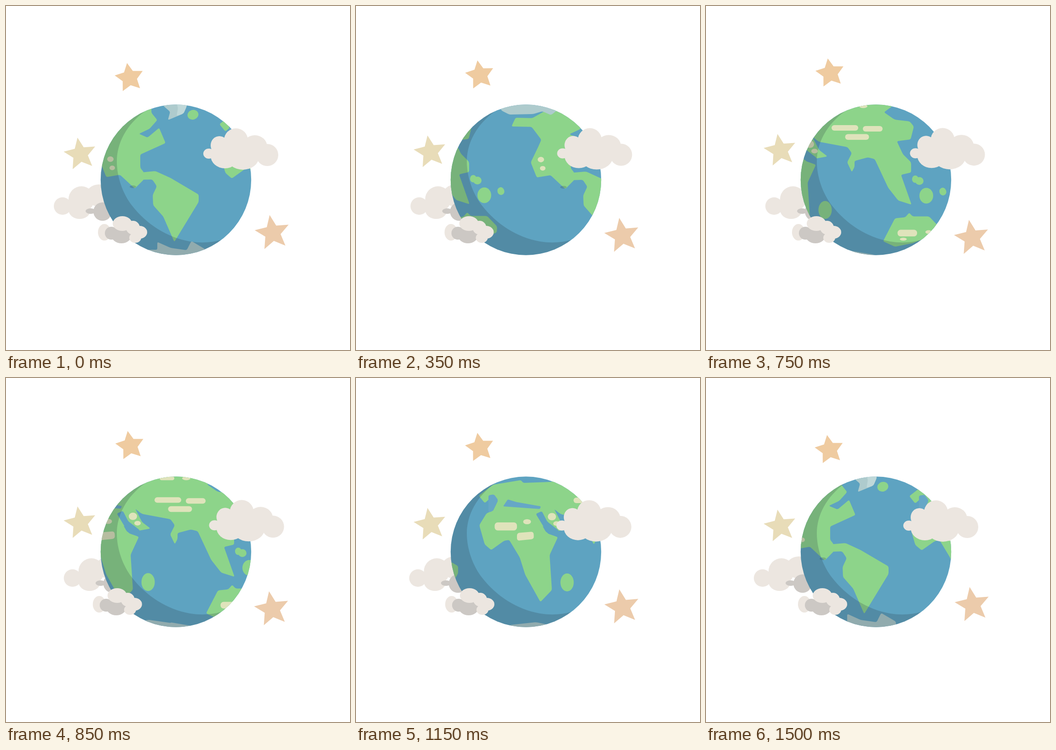
An HTML page with a canvas for the animation above (1.55 s loop, 748 by 748 pixels).

```html
<!DOCTYPE html>
<html lang="en">
<head>
<meta charset="utf-8">
<title>Spinning globe</title>
<style>
  html, body { margin: 0; overflow: hidden; background: #fff; }
  canvas { display: block; }
</style>
</head>
<body>
<canvas width="748" height="748"></canvas>
<script>
const ctx = document.querySelector('canvas').getContext('2d');
const LOOP = 1550, STEP = 50, TURN = 772, SPEED = 0.5, TILT = 0.005;
const SEA = '#5ea3c1', SEA_LIGHT = '#66a7c6', LAND = '#8dd48a', SAND = '#dfe3bb';
const ICE = '#aecbcd', ICE_LIGHT = '#bfd8d9', CLOUD = '#ece6e0', CLOUD_DARK = '#ccc8c4';
const SHADE = 'rgba(41,54,66,.22)';

// Closed outline through "x,y x,y ..." with softly rounded corners.
function coast(text, cut = 3.5) {
  const pts = text.trim().split(/\s+/).map(p => p.split(',').map(Number));
  const path = new Path2D();
  pts.forEach((p, i) => {
    const towards = q => {
      const k = Math.min(0.45, cut / Math.hypot(q[0] - p[0], q[1] - p[1]));
      return [p[0] + (q[0] - p[0]) * k, p[1] + (q[1] - p[1]) * k];
    };
    path.lineTo(...towards(pts.at(i - 1)));
    path.quadraticCurveTo(...p, ...towards(pts[(i + 1) % pts.length]));
  });
  path.closePath();
  return path;
}

function oval(x, y, rx, ry = rx, turn = 0) {
  const path = new Path2D();
  path.ellipse(x, y, rx, ry, turn, 0, 7);
  return path;
}

function pill(x, y, w, h) {
  const path = new Path2D();
  path.roundRect(x, y, w, h, Math.min(6.5, h / 2));
  return path;
}

function star(x, y, radius, waist) {
  const path = new Path2D();
  for (let i = 0; i < 10; i++) {
    const angle = (i * 36 - 99.3) * Math.PI / 180;
    const r = i % 2 ? radius * waist : radius;
    path.lineTo(x + r * Math.cos(angle), y + r * Math.sin(angle));
  }
  return path;
}

// Each region: how far its coordinates lie along the turn, then [colour, path] pairs.
const regions = [
  { at: 375, parts: [ // Eurasia
    [LAND, coast(`405,218 387,231 410,247 443,251 452,262 445,290 415,294 428,322 446,340 446,362 424,367
      447,432 418,423 396,395 367,333 352,329 323,337 323,350 317,361 307,340 317,320 308,307 245,295
      231,284 246,313 264,327 238,332 110,290 97,290 109,265 100,253 80,271 67,255 98,231 159,221
      163,227 225,225 300,195 400,195`)],
    [SAND, pill(273, 259, 58, 12)], [SAND, pill(341, 261, 43, 12)],
    [SAND, pill(302.5, 278.5, 52, 12.5)], [SAND, oval(342, 218, 9, 4)],
    [ICE, coast('300,545 307,531 367,541')],
  ] },
  { at: 575, parts: [ // Africa
    [LAND, coast(`268,320 280,362 294,374 322,354 333,352 356,390 368,428 401,487 426,461 421,385 439,346
      413,335 391,296 320,279 284,294`)],
    [SEA_LIGHT, coast('320,279 330,264 350,270 402,279 400,285', 2)],
    [SEA_LIGHT, coast('288,255 300,253 309,265 297,290 288,292')],
    [SAND, pill(301.5, 314, 48.5, 17.5)], [SAND, oval(372, 312.5, 8.5, 5.5)],
    [SAND, coast('350,337 386,334 387,350 350,354', 6)],
    [ICE, coast('330,545 334,537 392,531 420,537 420,545')],
  ] },
  { at: 475, parts: [ // Red Sea, Arabia, Madagascar
    [SEA, coast('291,295 304,289 316,312 341,331 341,346 317,338')],
    [SAND, oval(326, 301, 9, 8)], [SAND, oval(336, 316, 7, 5)], [SAND, pill(384, 214, 32, 8.5)],
    [LAND, oval(359, 444, 14.5, 19.5)],
    [ICE, coast('290,541 360,526 430,536 430,545')],
  ] },
  { at: 275, parts: [ // Australia and Pacific islands
    [LAND, coast('285,511 311,461 333,459 342,449 349,457 385,457 407,480 406,493 350,515 311,523')],
    [SAND, pill(316.5, 486, 42.5, 14.5)], [SAND, oval(384, 491, 7, 4)], [SAND, oval(329, 506.5, 7.5, 3.2)],
    [LAND, oval(355, 376, 7, 8)], [LAND, oval(364, 380, 9, 8.5)],
    [LAND, oval(379, 412, 15, 17)], [LAND, oval(415, 403, 7.5, 8.5, -0.3)],
    [LAND, coast('350,222 370,220 380,231 366,239 350,230')],
    [ICE, oval(369, 542, 30, 2)],
  ] },
  { at: 0, parts: [ // Americas
    [LAND, coast(`163,261 172,242 208,243 235,228 290,205 317,205 316,232 329,248 312,267 289,278 308,286
      333,265 347,298 292,323 292,352 300,362 300,377 280,397 248,367 218,372 205,339 220,308 228,290 207,262`)],
    [LAND, coast(`292,362 325,359 358,374 419,410 419,426 366,513 342,458 320,433 319,411 328,392 318,377
      292,378`)],
    [SHADE, oval(276, 393, 7, 3)],
    [SAND, oval(227, 333, 7, 6)], [SAND, oval(231, 352, 6, 5)],
    [LAND, oval(406.5, 236.5, 12, 10.5, -0.3)],
    [ICE, coast('340,200 342,217 357,230 352,248 386,234 393,218 393,200')],
    [ICE_LIGHT, coast('368,200 374,222 371,239 386,234 393,218 393,200')],
    [ICE, coast('300,545 306,530 329,530 329,513 358,526 393,531 403,511 435,530 435,545')],
  ] },
  { at: 175, parts: [ // Arctic ice
    [ICE, coast('298,190 316,227 333,236 385,235 405,229 424,237 440,225 440,190')],
  ] },
];

const globe = oval(369.5, 378, 163.7);
const nightSide = new Path2D(`M302 229C262 258 241 298 241 338C241 372 254 408 274 434
  C305 474 350 503 400 512Q436 518 470 508V560H190V200Z`);

// Floating pieces: travel at the far end of the drift, then [colour, path] pairs.
const backCloud = { dx: 25, dy: 0, parts: [
  [CLOUD, oval(123, 435, 19)], [CLOUD, oval(164, 420, 28)],
  [CLOUD, oval(160, 443, 24, 20)], [CLOUD, oval(202, 412, 28, 24)],
  [CLOUD_DARK, oval(184, 446, 11, 6)], [CLOUD_DARK, oval(210, 447, 20)],
] };
const floaters = [
  { dx: -13, dy: 0, parts: [
    [CLOUD, oval(214, 492, 14, 18)],
    [CLOUD_DARK, oval(229, 494, 14)], [CLOUD_DARK, oval(251, 498, 22, 18)],
    [CLOUD, oval(253, 473, 21, 16)], [CLOUD, oval(276, 482, 15)],
    [CLOUD, oval(290, 492, 17, 14)], [CLOUD, oval(281, 504, 13, 11)],
  ] },
  { dx: 14.5, dy: -0.8, parts: [
    [CLOUD, oval(441, 321, 12, 11)], [CLOUD, oval(464, 303, 19, 20)], [CLOUD, oval(500, 292, 26)],
    [CLOUD, oval(541, 306, 27, 25)], [CLOUD, oval(568, 324, 24)],
    [CLOUD, oval(515, 328, 35, 28)], [CLOUD, oval(476, 326, 31, 27)],
  ] },
  { dx: 1.6, dy: -10, parts: [['#efcba0', star(268.4, 156, 32.4, 0.51)]] },
  { dx: 0, dy: -8, parts: [['#e8dcb8', star(161.4, 322.2, 36.5, 0.46)]] },
  { dx: -1.5, dy: 10.5, parts: [['#eccbab', star(579.6, 493.4, 39.3, 0.45)]] },
];

function drawAt(parts, x, y) {
  ctx.save();
  ctx.translate(x, y);
  for (const [colour, path] of parts) {
    ctx.fillStyle = colour;
    ctx.fill(path);
  }
  ctx.restore();
}

// Eases out on the way there, comes back at a steady pace.
const drift = t => t < 750 ? 1 - (1 - t / 750) ** 1.37 : 2 - t / 750;

function frame(now) {
  const t = Math.floor(now % LOOP / STEP) * STEP;
  const d = drift(t);
  const float = ({ dx, dy, parts }) => drawAt(parts, dx * d, dy * d);

  ctx.fillStyle = '#fff';
  ctx.fillRect(0, 0, 748, 748);
  float(backCloud);

  ctx.save();
  ctx.clip(globe);
  ctx.fillStyle = SEA;
  ctx.fillRect(200, 200, 340, 350);
  for (const turn of [-TURN, 0, TURN]) {
    for (const { at, parts } of regions) {
      const x = t * SPEED - at + turn;
      drawAt(parts, x, x * TILT);
    }
  }
  ctx.fillStyle = SHADE;
  ctx.fill(nightSide);
  ctx.restore();

  floaters.forEach(float);
  requestAnimationFrame(frame);
}
requestAnimationFrame(frame);
</script>
</body>
</html>
```
